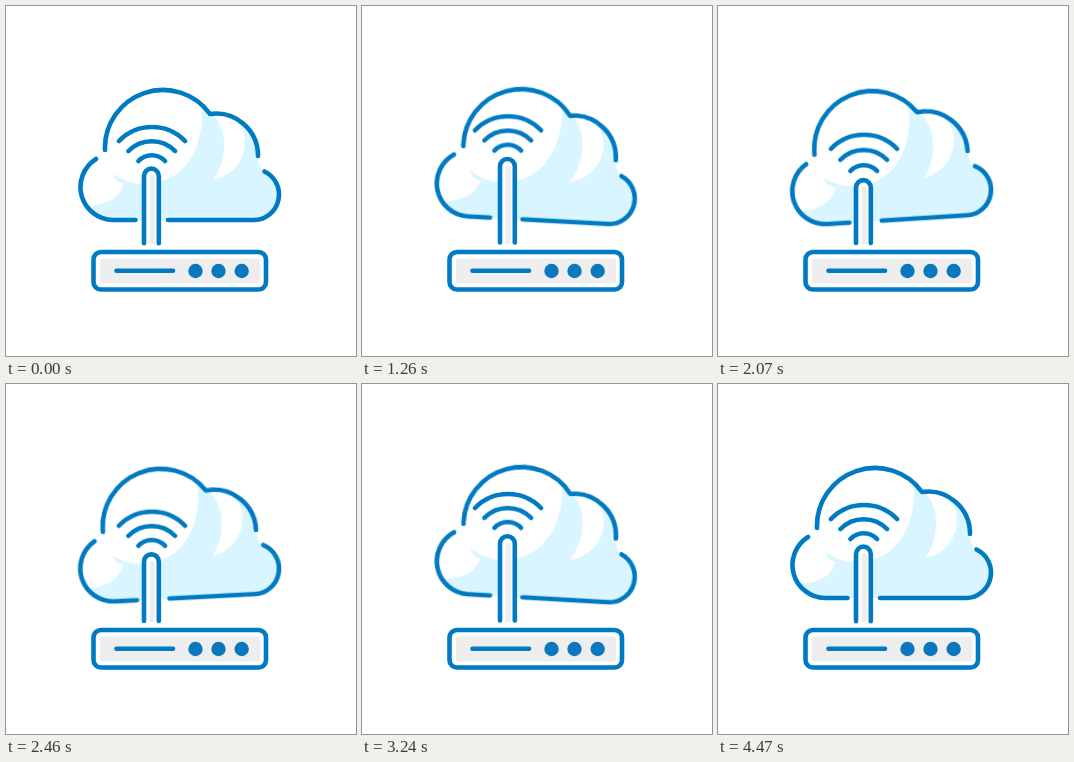
These frames come from a looping animation (350 px wide and 350 px high, 4.5 s). An HTML page:

```html
<!DOCTYPE html>
<html lang="en">
<head>
<meta charset="utf-8">
<title>Cloud router</title>
<style>
  html, body { margin: 0; width: 100%; height: 100%; overflow: hidden; background: #fff; }
  svg { display: block; width: 100vw; height: 100vh; }

  .line { fill: none; stroke: #007ac2; stroke-width: 4.6; stroke-linecap: round; stroke-linejoin: round; }
  .tint { fill: #d9f5ff; }
  .white { fill: #fff; }
  .grey { fill: #eee; }
  .dot { fill: #0a77be; }

  .cloud, .wave, .antenna path {
    animation: 4.5s ease-in-out infinite;
  }
  .cloud { transform-origin: 173px 186px; animation-name: sway; }
  .outer { animation-name: outer; }
  .middle { animation-name: middle; }
  .inner { animation-name: inner; }
  .antenna .tube { animation-name: tube; }
  .antenna .core { animation-name: core; }

  @keyframes sway {
    0%, 100% { transform: rotate(0deg); }
    25%, 73.3% { transform: rotate(3.3deg); }
    48.9% { transform: rotate(-3.8deg); }
  }
  @keyframes outer {
    0%, 100% { transform: translateY(0); }
    25%, 74% { transform: translateY(-11.3px); }
    49.5% { transform: translateY(8.5px); }
  }
  @keyframes middle {
    0%, 100% { transform: translateY(0); }
    25%, 73% { transform: translateY(-11.3px); }
    48.8% { transform: translateY(9.3px); }
  }
  @keyframes inner {
    0%, 100% { transform: translateY(0); }
    25%, 72% { transform: translateY(-11.3px); }
    48% { transform: translateY(10.2px); }
  }
  @keyframes tube {
    0%, 100% { d: path("M138 237.3V170a7.4 7.4 0 0 1 14.8 0V237.3"); }
    25%, 71% { d: path("M138 236.5V159.6a7.4 7.4 0 0 1 14.8 0V236.5"); }
    47.8% { d: path("M138 237V181.8a7.4 7.4 0 0 1 14.8 0V237"); }
  }
  @keyframes core {
    0%, 100% { d: path("M143.5 238V172a2.7 2.7 0 0 1 5.4 0V238Z"); }
    25%, 71% { d: path("M143.5 238V161.6a2.7 2.7 0 0 1 5.4 0V238Z"); }
    47.8% { d: path("M143.5 238V183.8a2.7 2.7 0 0 1 5.4 0V238Z"); }
  }
</style>
</head>
<body>
<svg viewBox="0 0 350 350">
  <g class="cloud">
    <path class="tint" d="M99 142A58 58 0 0 1 204 108A42 42 0 0 1 251 152L256 165A25 25 0 0 1 248 214H107A33 33 0 0 1 90 153Z"/>
    <path class="white" d="M97 146A58 58 0 0 1 195 99C200 131 184 178 138 178C128 178 118 175 107 168C109 174 113 177 118 178C112 194 99 199 80 200A33 33 0 0 1 90 153Z"/>
    <path class="white" d="M206 108C222 122 222 154 207 174C228 170 240 152 239 134C238 122 231 111 219 107Z"/>
    <g class="line">
      <path d="M99 144A58 58 0 0 1 204 108A42 42 0 0 1 252 150"/>
      <path d="M90 153A33 33 0 0 0 107 214H129.5"/>
      <path d="M258.500 165.500A25.500 25.500 0 0 1 248 214H162"/>
    </g>
  </g>

  <g class="line">
    <path class="wave outer" d="M113 135A46 46 0 0 1 179 135"/>
    <path class="wave middle" d="M122.500 145A32.500 32.500 0 0 1 169 145"/>
    <path class="wave inner" d="M132.500 155A18 18 0 0 1 159 155"/>
  </g>

  <g class="antenna">
    <path class="tube white" d="M138 237.3V170a7.4 7.4 0 0 1 14.8 0V237.3"/>
    <path class="core grey" d="M143.500 238V172a2.700 2.700 0 0 1 5.400 0V238Z"/>
    <path class="tube line" d="M138 237.3V170a7.4 7.4 0 0 1 14.8 0V237.3"/>
  </g>

  <rect class="line" x="87.500" y="246" width="172.500" height="37.500" rx="7.500"/>
  <rect class="grey" x="94" y="252.500" width="160" height="25" rx="2"/>
  <path class="line" d="M110.500 264.700H167"/>
  <g class="dot">
    <circle cx="189.500" cy="265" r="7.200"/>
    <circle cx="212.500" cy="265" r="7.200"/>
    <circle cx="235.700" cy="265" r="7.200"/>
  </g>
</svg>
</body>
</html>
```
